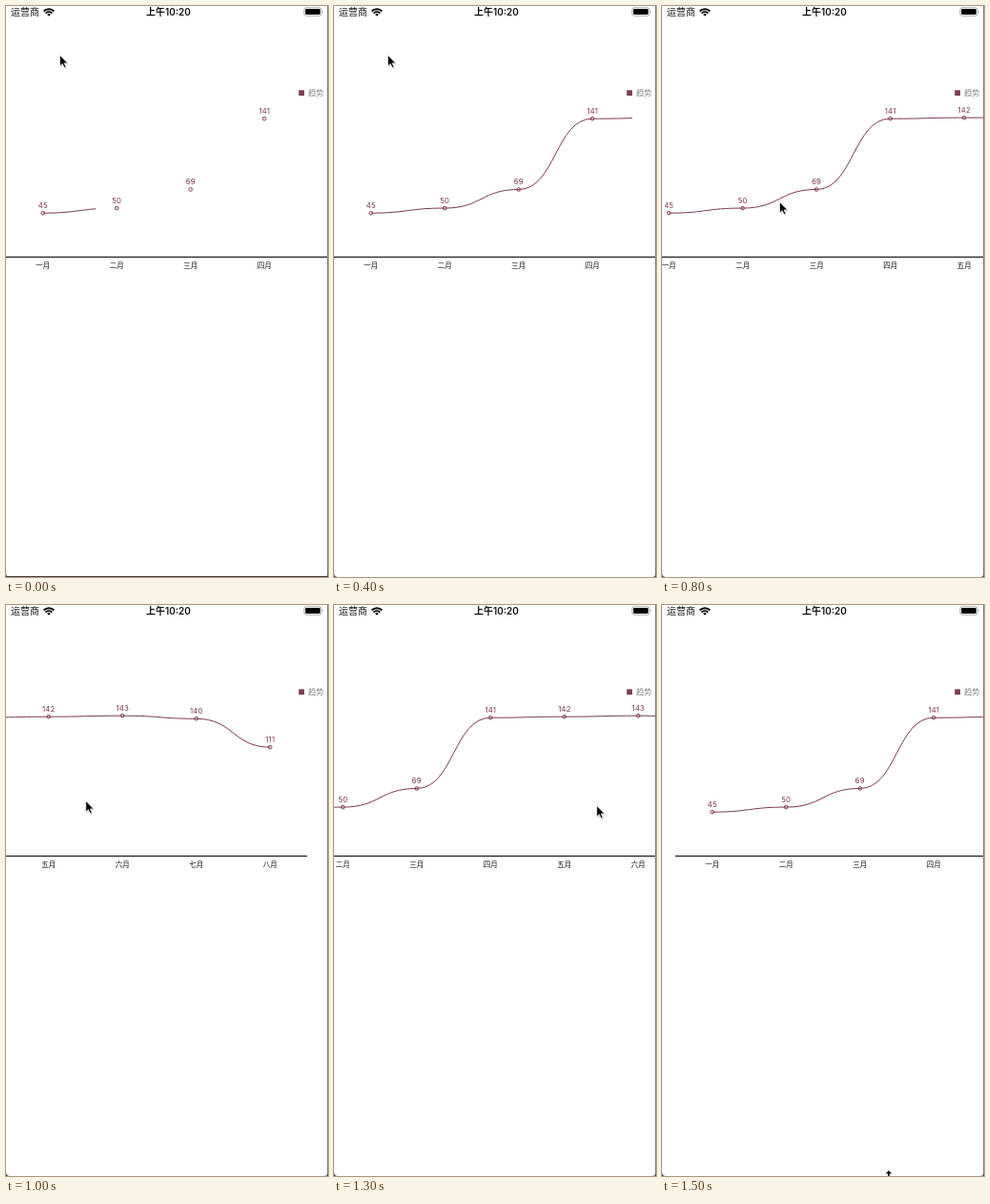
An HTML page that plays this animation: 338 by 599 pixels, repeating every 1600 ms.

```html
<!DOCTYPE html>
<html lang="zh">
<head>
<meta charset="utf-8">
<title>趋势</title>
<style>
  html, body { margin: 0; width: 100%; height: 100%; overflow: hidden; background: #fff; }
  svg { display: block; width: 338px; height: 599px; }
  text { font-family: Inter, "Noto Sans CJK SC", "Noto Sans CJK", sans-serif; }
  .value { font-size: 7.8px; letter-spacing: .15px; fill: #7a3a4c; text-anchor: middle; }
  .month { font-size: 7.5px; font-weight: 500; fill: #111; text-anchor: middle; }
  .status { font-size: 10px; fill: #111; }
  .trend { fill: none; stroke: #7a3a4c; stroke-width: 1; }
</style>
</head>
<body>
<svg viewBox="0 0 338 599">
  <rect width="338" height="599" fill="#fff"/>

  <g id="chart">
    <path d="M0 263.4H620" stroke="#222" stroke-width="1.1"/>
    <path id="line" class="trend"/>
    <g id="points"></g>
  </g>

  <rect x="307.3" y="88.3" width="5.8" height="5.8" fill="#7a3f50"/>
  <text x="317" y="94.2" font-size="8.4" fill="#858585">趋势</text>

  <text class="status" x="5" y="10">运营商</text>
  <text class="status" x="170.5" y="10" font-weight="600" text-anchor="middle">上午10:20</text>
  <g fill="none" stroke="#000" stroke-width="1.8">
    <path d="M39.6 5.5A7.6 7.6 0 0 1 50.4 5.5"/>
    <path d="M41.6 7.6A4.8 4.8 0 0 1 48.4 7.6"/>
  </g>
  <path d="M45 10.8L43.2 9A2.5 2.5 0 0 1 46.8 9Z"/>
  <rect x="312.9" y="1.7" width="18.2" height="8.6" rx="2.3" fill="none" stroke="#999" stroke-width=".8"/>
  <rect x="314.2" y="3" width="15.6" height="6" rx="1.2"/>
  <path d="M332.2 4.5Q333.6 6 332.2 7.5Z" fill="#999"/>

  <path d="M337.5 0V599" stroke="#888"/>
  <path d="M0 595.5V599H3.5Q.5 598.5 0 595.5ZM338 595.5V599H334.5Q337.5 598.5 338 595.5Z" fill="#555"/>
  <path id="edge" d="M0 598.5H338" stroke="#4a3c3c"/>

  <circle id="press" cx="83.6" cy="207.2" r="14.8" fill="none" stroke="#000" stroke-width="2.3"/>
  <g id="arrow">
    <path d="M1 1.5V13L3.8 10.4L5.6 14.4L7.4 13.6L5.7 9.8H9.2Z" opacity=".2"/>
    <path d="M0 0V11.6L2.7 9.1L4.5 13.2L6.4 12.4L4.6 8.4H8.2Z" stroke="#fff" stroke-width=".7"/>
  </g>
  <path id="resize" d="M238 593.2L241.2 596.6H238.8V599H237.2V596.6H234.8Z"/>
</svg>
<script>
const $ = id => document.getElementById(id);
const LOOP = 1600, STEP = 100, GAP = 77.5, END = 282;
const values = [45, 50, 69, 141, 142, 143, 140, 111];
const months = '一二三四五六七八';
const xAt = i => GAP * (i + .5);
const yAt = v => 263.6 - 1.031 * v;

// 0 before a, 1 after b, linear between
const ramp = (t, a, b) => Math.min(1, Math.max(0, (t - a) / (b - a)));
const decay = (t, from, tau) => Math.exp((from - t) / tau);

// Swipe to the end, spring back, drag to the start, spring back
function scrollAt(t) {
  if (t < 1000) return (END + 22) * ramp(t, 700, 1000) ** 2.06;
  if (t <= 1200) return END + 22 * decay(t, 1000, 65);
  if (t < 1400) return END - (END + 25) * ramp(t, 1200, 1400) ** .81;
  return -25 * decay(t, 1400, 172);
}

// Glide in, swipe left, drag right, leave at the bottom
function cursorAt(t) {
  const glide = ramp(t, 500, 700), swipe = ramp(t, 700, 926);
  const drag = ramp(t, 1200, 1300), leave = ramp(t, 1300, 1500);
  return [
    56.5 + 98.5 * glide - 71.2 * swipe + 192 * drag - 38 * leave,
    51.5 + 154 * glide + 5 * drag + 383 * leave
  ];
}

const line = $('line');
line.setAttribute('d', values.map((v, i) => {
  const x = xAt(i), y = yAt(v), mid = x - GAP / 2;
  return i ? `C${mid} ${yAt(values[i - 1])} ${mid} ${y} ${x} ${y}` : `M${x} ${y}`;
}).join(''));

$('points').innerHTML = values.map((v, i) => {
  const x = xAt(i), y = yAt(v);
  return `<circle class="trend" cx="${x}" cy="${y}" r="1.8"/>
    <text class="value" x="${x}" y="${y - 5}">${v}</text>
    <text class="month" x="${x}" y="274.6">${months[i]}月</text>`;
}).join('');

const total = line.getTotalLength();
const show = (id, on) => $(id).setAttribute('visibility', on ? 'visible' : 'hidden');

function draw(time) {
  const t = Math.floor(time % LOOP / STEP) * STEP;
  const drawn = Math.min(total, 55.7 + .645 * t);
  line.setAttribute('stroke-dasharray', `${drawn} ${total + 10}`);
  $('chart').setAttribute('transform', `translate(${-scrollAt(t)} 0)`);
  $('arrow').setAttribute('transform', `translate(${cursorAt(t)})`);
  show('arrow', t < 1500);
  show('resize', t === 1500);
  show('press', t === 1200);
  show('edge', t === 0);
}

let begin;
function tick(now) {
  begin ??= now;
  draw(now - begin);
  requestAnimationFrame(tick);
}
draw(0);
requestAnimationFrame(tick);
</script>
</body>
</html>
```
